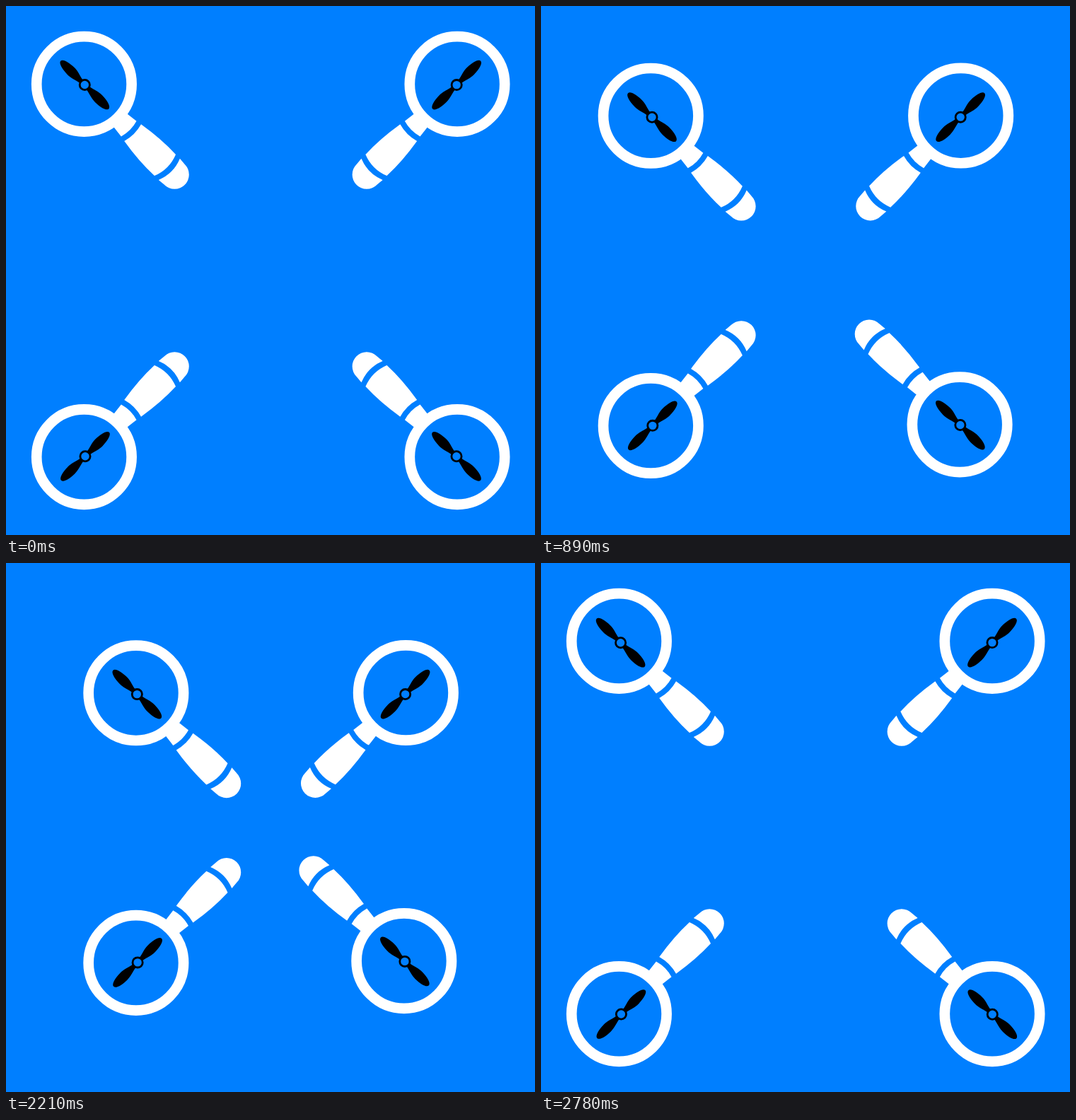
These frames come from a looping animation (748x748 px, 2810 ms). An HTML page:

```html
<!DOCTYPE html>
<html lang="en">
<head>
<meta charset="utf-8">
<title>Magnifier drone</title>
<style>
  html, body { margin: 0; width: 100%; height: 100%; overflow: hidden; background: #007fff; }
  svg { display: block; width: 100vw; height: 100vh; }
</style>
</head>
<body>
<svg id="stage" viewBox="0 0 748 748">
  <defs>
    <!-- handle points along +x from the lens centre -->
    <g id="glass">
      <circle r="67.2" fill="none" stroke="#fff" stroke-width="14.7"/>
      <g fill="#fff">
        <path d="M70-13.3 73-13.3 89.5-15.3Q94 0 89.5 15.3L73 13.3 70 13.3Z"/>
        <path d="M97.2-16.8Q132-22.5 162-21.3Q170.5 0 162 21.3Q132 22.5 97.2 16.8Q102 0 97.2-16.8Z"/>
        <path d="M170.3-21.3 181-20.4A20.4 20.4 0 0 1 181 20.4L170.3 21.3Q179 0 170.3-21.3Z"/>
      </g>
    </g>
    <path id="blade" d="M7-3C16-4.6 20-7.1 28-7C38-6.8 48-4.5 48 0C48 4.5 38 6.8 28 7C20 7.1 16 4.6 7 3Z"/>
    <g id="prop">
      <use href="#blade"/>
      <use href="#blade" transform="rotate(180)"/>
      <circle r="7.1" fill="#007fff" stroke="#000" stroke-width="2.8"/>
    </g>
  </defs>
</svg>
<script>
const LOOP = 2810, STEP = 30;
const svg = document.getElementById('stage');

// far / near: lens centre apart and together; rest: hub before the spin;
// hubFar / hubNear: hub after it; tilt: handle angle; turn: spin direction
const drones = [
  { far: [110.4, 110.4], near: [222.5, 222.4], rest: [111.3, 111.5], hubFar: [112.6, 112.7], hubNear: [223.6, 224], tilt: 45, turn: 1 },
  { far: [638, 110.4], near: [527.1, 222], rest: [637.2, 111.6], hubFar: [638, 112.6], hubNear: [526, 224], tilt: 135, turn: -1 },
  { far: [110.4, 637.6], near: [222.5, 527.4], rest: [112, 636.8], hubFar: [113.4, 638], hubNear: [224.4, 526.4], tilt: -45, turn: 1 },
  { far: [638, 637.6], near: [523.2, 523.2], rest: [637, 636.8], hubFar: [638.3, 638.2], hubNear: [524.7, 524], tilt: 225, turn: -1 }
];

function addUse(id) {
  const el = document.createElementNS('http://www.w3.org/2000/svg', 'use');
  el.setAttribute('href', id);
  return svg.appendChild(el);
}
for (const d of drones) {
  d.glass = addUse('#glass');
  d.prop = addUse('#prop');
}

const mix = (a, b, k) => a.map((v, i) => v + (b[i] - v) * k);

// progress in whole steps, from 0 to 1
function stepped(t, start, count) {
  const n = Math.floor((t - start) / STEP + 1e-6);
  return Math.min(Math.max(n, 0), count) / count;
}

function place(el, [x, y], angle) {
  el.setAttribute('transform', `translate(${x} ${y}) rotate(${angle})`);
}

function draw(t) {
  const spin = stepped(t, 0, 20);
  const closed = stepped(t, 770, 10) - stepped(t, 1910, 29);
  for (const d of drones) {
    const hub = spin < 1 ? mix(d.rest, d.hubFar, spin) : mix(d.hubFar, d.hubNear, closed);
    place(d.glass, mix(d.far, d.near, closed), d.tilt);
    place(d.prop, hub, d.tilt + d.turn * 360 * spin);
  }
}

const began = performance.now();
function tick() {
  draw((performance.now() - began) % LOOP);
  requestAnimationFrame(tick);
}
tick();
</script>
</body>
</html>
```
